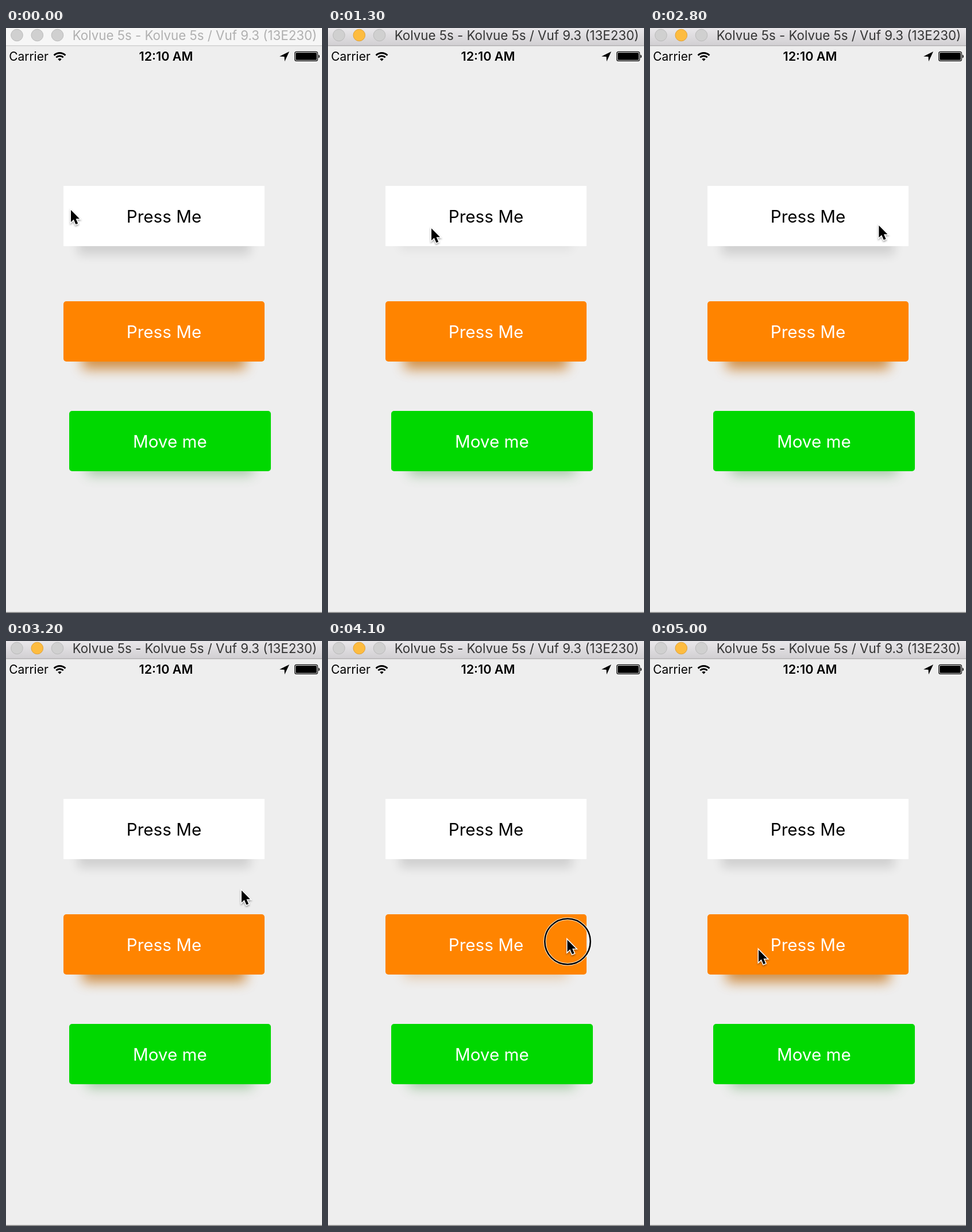
These frames come from a looping animation (550 px wide and 1019 px high, 5.1 s). An HTML page:

```html
<!DOCTYPE html>
<html lang="en">
<head>
<meta charset="utf-8">
<title>Button shadows</title>
<style>
  html, body { margin: 0; width: 100%; height: 100%; overflow: hidden; background: #eee; }
  svg { display: block; width: 550px; height: 1019px; }
  text { font-family: Inter, Roboto, sans-serif; text-anchor: middle; }
  .label { font-size: 29.6px; }
  .status { font-size: 21px; }
  .clock { font-size: 21.6px; font-weight: 600; }
  .title { font-size: 22.3px; fill: #b0b0b0; }
  .light { fill: #d0d0d0; stroke: #bababa; }
  .bar { fill: #f6f6f6; }
  .rule { fill: #d2d2d2; }
  .active .bar { fill: url(#chrome); }
  .active .rule { fill: #b3b1b3; }
  .active .title { fill: #343434; }
  .active .minimise { fill: #fdbc40; stroke: #e0a136; }
  .soft { filter: blur(11px); }
  .softer { filter: blur(9px); }
  .pointer { filter: drop-shadow(0 2px 1.5px rgba(0, 0, 0, .35)); }
</style>
</head>
<body>
<svg viewBox="0 0 550 1019">
  <defs>
    <linearGradient id="chrome" x2="0" y2="1">
      <stop offset="0" stop-color="#e9e7ea"/>
      <stop offset="1" stop-color="#d1cfd2"/>
    </linearGradient>
  </defs>
  <rect width="550" height="1019" fill="#eee"/>

  <g id="window">
    <rect class="bar" width="550" height="31"/>
    <rect class="rule" y="30" width="550" height="1.5"/>
    <circle class="light" cx="19" cy="12.5" r="10.3"/>
    <circle class="light minimise" cx="54.3" cy="12.5" r="10.3"/>
    <circle class="light" cx="89.5" cy="12.5" r="10.3"/>
    <text class="title" x="328.5" y="21">Kolvue 5s - Kolvue 5s / Vuf 9.3 (13E230)</text>
  </g>

  <text class="status" x="39.5" y="57">Carrier</text>
  <g fill="none" stroke="#000" stroke-width="2.9">
    <path d="M83.6 47.6a14 14 0 0 1 19.8 0M87.3 51.3a8.7 8.7 0 0 1 12.4 0"/>
    <path d="M93.5 57.5l-3.2-3.2a4.5 4.5 0 0 1 6.4 0z" fill="#000" stroke="none"/>
  </g>
  <text class="clock" x="278.5" y="57">12:10 AM</text>
  <path d="M493 41L476 49.6L484.5 50L485 58.3Z"/>
  <rect x="502.6" y="41.4" width="39.8" height="16" rx="3" fill="none" stroke="#000" stroke-width="1.1"/>
  <rect x="504.2" y="43" width="36.6" height="12.8" rx="1.6"/>
  <path d="M543.8 46.3q2 .7 2 3.1t-2 3.1z"/>

  <rect id="greyShade" class="softer" x="125" y="330" width="300" height="65" opacity=".12"/>
  <rect x="100" y="275" width="350" height="105" fill="#fff"/>
  <text class="label" x="275" y="339">Press Me</text>

  <rect id="orangeShade" class="soft" x="133" y="520" width="284" height="74" fill="#c56c08" opacity=".74"/>
  <rect x="100" y="476" width="350" height="105" rx="5" fill="#ff8400"/>
  <text class="label" x="275" y="540" fill="#fff">Press Me</text>

  <rect class="soft" x="141" y="710" width="289" height="68" fill="#2a8a2a" opacity=".4"/>
  <rect x="110" y="667" width="351" height="105" rx="5" fill="#00d800"/>
  <text class="label" x="285.3" y="731" fill="#fff">Move me</text>

  <rect y="1017.5" width="550" height="1.5" fill="#7c7c7c"/>

  <g id="cursor">
    <g id="ring" fill="none">
      <circle cx=".5" cy="3" r="39.7" stroke="#fff" stroke-width="4.6" opacity=".85"/>
      <circle cx=".5" cy="3" r="39.7" stroke="#000" stroke-width="2.6"/>
    </g>
    <path class="pointer" d="M0 0V21L4.8 16.6L8.4 25L12.2 23.4L8.6 15.2H15Z"
      stroke="#fff" stroke-width="3" paint-order="stroke"/>
  </g>
</svg>
<script>
  const LOOP = 5100, TICK = 100;
  const $ = id => document.getElementById(id);

  // time, x, y of the pointer tip
  const path = [
    [0, 113, 317], [200, 180, 349], [1400, 180, 349], [2200, 397, 333.5],
    [2700, 397, 333.5], [3200, 410, 434.5], [3700, 416.5, 520.5],
    [4400, 416.5, 520.5], [5000, 189, 538]
  ];
  // time, how far the button is pushed down
  const greyPress = [[600, 0], [900, 1], [1300, 1], [1700, 0]];
  const orangePress = [[3800, 0], [4100, 1], [4300, 1], [4700, 0]];
  const clicks = [[500, 1200], [3800, 4300]];

  const ease = p => p * p * (3 - 2 * p);

  function sample(keys, t) {
    const next = keys.findIndex(k => k[0] > t);
    if (next === 0) return keys[0].slice(1);
    if (next < 0) return keys[keys.length - 1].slice(1);
    const a = keys[next - 1], b = keys[next];
    const p = ease((t - a[0]) / (b[0] - a[0]));
    return a.slice(1).map((v, i) => v + (b[i + 1] - v) * p);
  }

  function shade(id, keys, t, full, low) {
    const [p] = sample(keys, t);
    $(id).setAttribute('opacity', full + (low - full) * p);
    $(id).setAttribute('transform', `translate(0 ${-8 * p})`);
  }

  function draw(now) {
    const t = Math.floor((now % LOOP) / TICK) * TICK;
    const [x, y] = sample(path, t);
    $('cursor').setAttribute('transform', `translate(${x} ${y})`);
    $('ring').style.display = clicks.some(([a, b]) => t >= a && t < b) ? '' : 'none';
    $('window').classList.toggle('active', t >= 700);
    shade('greyShade', greyPress, t, .12, .05);
    shade('orangeShade', orangePress, t, .74, .32);
  }

  const start = performance.now();
  function frame() {
    draw(performance.now() - start);
    requestAnimationFrame(frame);
  }
  frame();
</script>
</body>
</html>
```
